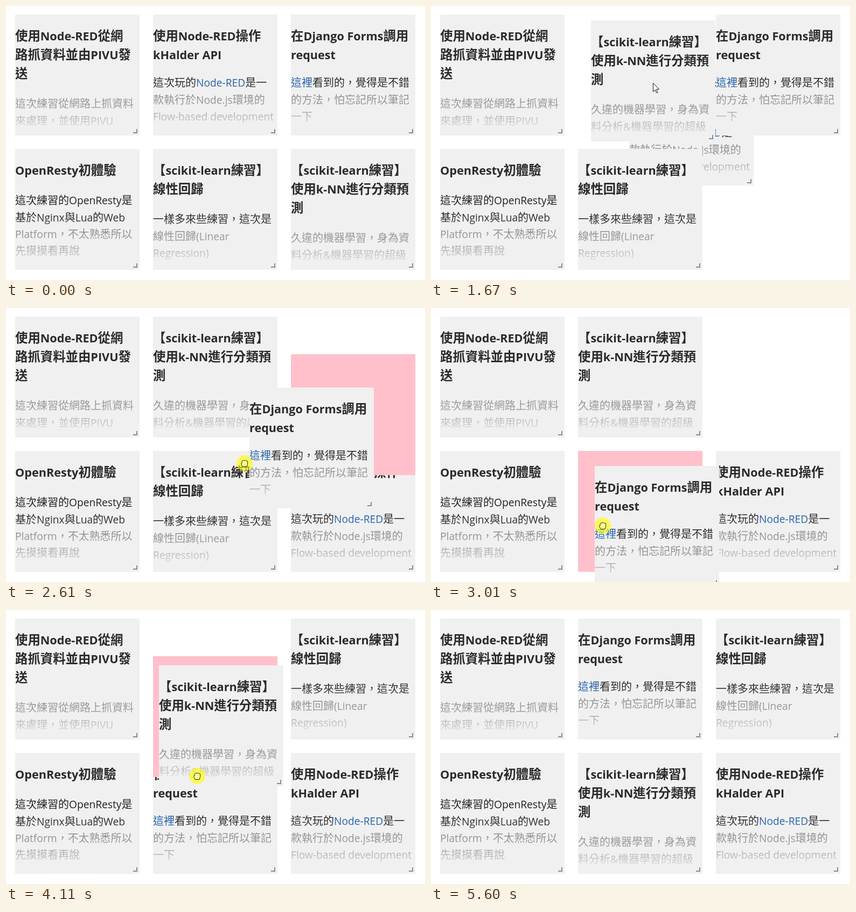
An HTML page for the animation above (6290 ms loop, 778 by 510 pixels).

```html
<!DOCTYPE html>
<html lang="zh-Hant">
<head>
<meta charset="utf-8">
<title>Sortable cards</title>
<style>
html, body { margin: 0; width: 100%; height: 100%; overflow: hidden; background: #fff; }
#stage { position: relative; width: 778px; height: 510px; overflow: hidden; }
.card, .slot, #pointer { position: absolute; left: 0; top: 0; }
.card, .slot { width: 231px; height: 225px; }
.card { z-index: 1; overflow: hidden; background: #f0f0f0; color: #222; }
.card.up { z-index: 3; }
.slot { z-index: 2; background: #ffc0cb; }
#pointer { z-index: 4; overflow: visible; width: 1px; height: 1px; }
.row { position: absolute; left: 0; white-space: nowrap; }
.head { font: 700 23.4px/35px 'Noto Sans CJK TC', 'Noto Sans CJK JP', 'Noto Sans CJK', sans-serif; color: #2a2a2a; }
.text { font: 20px/31.3px 'Noto Sans CJK TC', 'Noto Sans CJK JP', 'Noto Sans CJK', sans-serif; }
.latin { font: .96em/0 'Open Sans', 'Noto Sans', sans-serif; }
.head .latin { font-size: .925em; font-weight: 700; }
.comma { font: 1em/0 'Noto Sans CJK JP', 'Noto Sans CJK SC', sans-serif; }
.row em { font-style: normal; color: #1c5ba8; }
.fade {
  position: absolute; inset: 118px 0 0;
  background: linear-gradient(#f0f0f000, #f0f0f026 22px, #f0f0f085 32px, #f0f0f09e 57px, #f0f0f0d1 82px, #f0f0f0 98px);
}
.grip {
  position: absolute; left: 219px; top: 213px; width: 6px; height: 6px;
  border: solid #8a8a8a; border-width: 0 2px 2px 0;
}
</style>
</head>
<body>
<div id="stage">
  <div class="slot"></div>
  <svg id="pointer">
    <path id="arrow" d="M.5 .5V16.5L4.2 13 6.7 18.7 9 17.7 6.5 12H11.5Z" fill="#fff" stroke="#111"/>
    <g id="hand">
      <circle r="15" fill="#ff0" fill-opacity=".62"/>
      <path d="M-4 6.5L-6.3 1.5Q-7-.8-4.8-.5L-4.8-3.5Q-4-5.8-2.2-4.6Q-1-6.3.6-5Q2-6.2 3.2-4.5Q5.3-5 5.6-3V1.5L4 6.5Z"
        fill="#ffff8c" stroke="#222"/>
    </g>
  </svg>
</div>
<script>
const LOOP = 6290, LAG = 30, SETTLE = 90, SLIDE = 300;

// heading rows, text rows, centre of the first text row; {…} marks a link
const CARDS = [
  [['使用Node-RED從網', '路抓資料並由PIVU發', '送'], ['這次練習從網路上抓資料', '來處理，並使用PIVU'], 166],
  [['使用Node-RED操作', 'kHalder API'], ['這次玩的{Node-RED}是一', '款執行於Node.js環境的', 'Flow-based development'], 127],
  [['在Django Forms調用', 'request'], ['{這裡}看到的，覺得是不錯', '的方法，怕忘記所以筆記', '一下'], 127],
  [['OpenResty初體驗'], ['這次練習的OpenResty是', '基於Nginx與Lua的Web', 'Platform，不太熟悉所以', '先摸摸看再說'], 96],
  [['【scikit-learn練習】', '線性回歸'], ['一樣多來些練習，這次是', '線性回歸(Linear', 'Regression)'], 131],
  [['【scikit-learn練習】', '使用k-NN進行分類預', '測'], ['久違的機器學習，身為資', '料分析&機器學習的超級'], 166]
];

const SLOTS = [0, 1, 2, 3, 4, 5].map(i => [17 + i % 3 * 256, i < 3 ? 16 : 266]);

// hops: [time, slot] where the placeholder heads next
const DRAGS = [
  { card: 5, from: 5, to: 1, grab: [101, 110], down: 480, up: 1500, hops: [[869, 4], [902, 1]] },
  { card: 2, from: 2, to: 4, grab: [15, 111], down: 2140, up: 3240, hops: [[2552, 5], [2640, 4]] },
  { card: 5, from: 1, to: 4, grab: [65, 184], down: 3870, up: 4570, hops: [[4042, 4]] }
];

// pointer path: time, x, y
const PATH = [
  [70, 656, 454], [230, 648, 420], [390, 630, 376], [590, 630, 376], [660, 622, 370],
  [740, 595, 345], [820, 545, 298], [890, 493, 245], [960, 449, 187], [1040, 422, 157],
  [1110, 413, 146], [1190, 412, 143], [1750, 412, 143], [1910, 470, 125], [2070, 544, 127],
  [2220, 544, 127], [2450, 530, 165], [2530, 507, 209], [2610, 443, 289], [2690, 365, 345],
  [2850, 322, 400], [2930, 319, 405], [3400, 319, 405], [3600, 325, 290],
  [3780, 338, 200], [3880, 338, 200], [4020, 339, 250], [4100, 355, 309],
  [4180, 366, 390], [4260, 370, 440], [4400, 370, 462], [5350, 370, 462], [5430, 450, 480],
  [5510, 544, 498]
];

// the screen refreshes in bursts: first, last, count
const BURSTS = [
  [70, 480, 6], [660, 1270, 9], [1500, 2070, 8], [2140, 2690, 8], [2770, 3010, 4],
  [3240, 3780, 8], [3870, 4490, 9], [4570, 4960, 6], [5430, 5600, 3]
];
const TICKS = [0, ...BURSTS.flatMap(([a, b, n]) =>
  Array.from({ length: n }, (_, i) => Math.floor((a + i * (b - a) / (n - 1)) / 10) * 10))];

const mix = (a, b, k) => a.map((v, i) => v + (b[i] - v) * k);

// cubic-bezier(.25, .1, .25, 1)
function ease(x) {
  if (x <= 0) return 0;
  if (x >= 1) return 1;
  const curve = (s, p, q) => 3 * s * (1 - s) ** 2 * p + 3 * s * s * (1 - s) * q + s ** 3;
  let lo = 0, hi = 1;
  for (let i = 0; i < 24; i++) {
    const mid = (lo + hi) / 2;
    if (curve(mid, .25, .25) < x) lo = mid; else hi = mid;
  }
  return curve(lo, .1, 1);
}

function pointerAt(t) {
  const n = PATH.findIndex(p => p[0] > t);
  if (n < 0) return PATH[PATH.length - 1].slice(1);
  if (n === 0) return PATH[0].slice(1);
  const [a, b] = [PATH[n - 1], PATH[n]];
  return mix(a.slice(1), b.slice(1), (t - a[0]) / (b[0] - a[0]));
}

function placeholderAt(drag, t) {
  let pos = SLOTS[drag.from];
  drag.hops.forEach(([start, slot], i) => {
    const next = drag.hops[i + 1];
    const end = next ? Math.min(t, next[0]) : t;
    pos = mix(pos, SLOTS[slot], ease((end - start) / SLIDE));
  });
  return pos;
}

function layoutAt(t) {
  const order = [0, 1, 2, 3, 4, 5];
  const pos = SLOTS.slice();
  let top = -1;
  for (const d of DRAGS) {
    if (t < d.down) break;
    const drop = d.up + SETTLE;
    const held = pointerAt(Math.min(t, drop) - LAG).map((v, i) => v - d.grab[i]);
    const k = ease((t - drop) / SLIDE);
    const other = order[d.to];
    pos[d.card] = t < drop ? held : mix(held, SLOTS[d.to], k);
    pos[other] = mix(SLOTS[d.to], SLOTS[d.from], k);
    order[d.to] = d.card;
    order[d.from] = other;
    top = k < 1 ? d.card : -1;
  }
  return { pos, top };
}

const markup = s => s
  .replace(/[\w&.()-][\w&.() -]*/g, m => `<span class="latin">${m.replace('&', '&amp;')}</span>`)
  .replace(/，/g, '<span class="comma">，</span>')
  .replace(/{(.*?)}/g, '<em>$1</em>');

const rows = (list, kind, top, step) => list.map((s, i) =>
  `<div class="row ${kind}" style="top:${top + i * step}px">${markup(s)}</div>`).join('');

const stage = document.getElementById('stage');
const slot = stage.querySelector('.slot');
const pointer = document.getElementById('pointer');
const arrow = document.getElementById('arrow');
const hand = document.getElementById('hand');

const cards = CARDS.map(([head, text, y]) => {
  const el = document.createElement('div');
  el.className = 'card';
  el.innerHTML = rows(text, 'text', y - 16.7, 31.3) + '<div class="fade"></div>' +
    rows(head, 'head', 21.3, 35) + '<div class="grip"></div>';
  return stage.appendChild(el);
});

const place = (el, [x, y]) => {
  el.style.transform = `translate(${Math.round(x)}px, ${Math.round(y)}px)`;
};
const show = (el, on) => { el.style.display = on ? '' : 'none'; };

function draw(t) {
  const { pos, top } = layoutAt(t);
  cards.forEach((el, i) => {
    place(el, pos[i]);
    el.classList.toggle('up', i === top);
  });
  const drag = DRAGS.find(d => t >= d.down && t < d.up);
  show(slot, drag);
  if (drag) place(slot, placeholderAt(drag, t));
  show(pointer, t >= 70 && t < 5600);
  show(hand, drag);
  show(arrow, !drag);
  place(pointer, pointerAt(t));
}

const start = performance.now();
let last = -1;
function frame() {
  const now = Math.max(0, performance.now() - start) % LOOP;
  const tick = TICKS.filter(v => v <= now).pop();
  if (tick !== last) draw(last = tick);
  requestAnimationFrame(frame);
}
frame();
</script>
</body>
</html>
```
